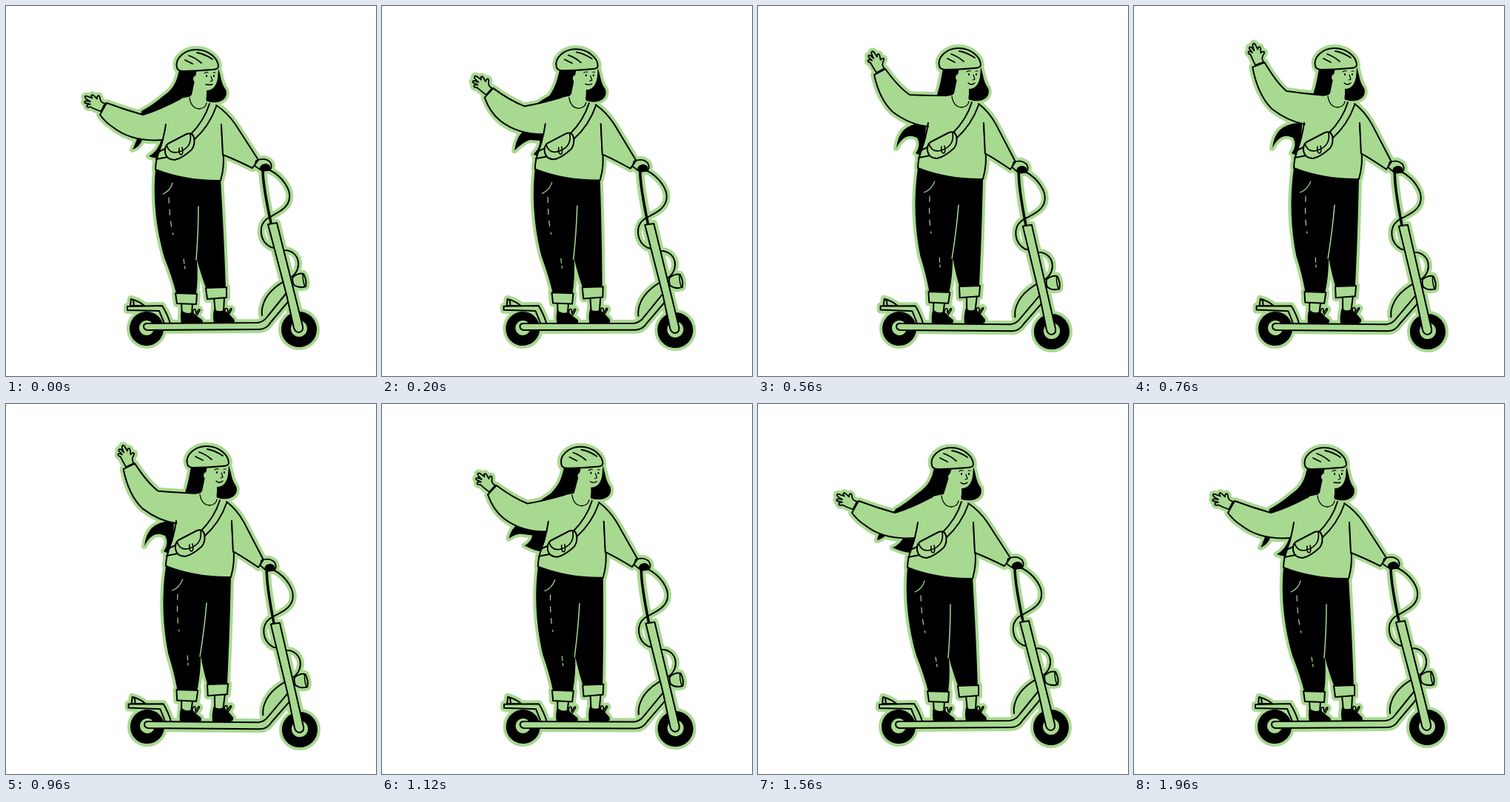
Recreate the animation shown at these times as an HTML page with a canvas. Size 500 px wide and 500 px high, loop 2 s.

```html
<!DOCTYPE html>
<html lang="en">
<head>
<meta charset="utf-8">
<title>Scooter wave</title>
<style>
html, body { margin: 0; width: 100%; height: 100%; overflow: hidden; background: #fff; }
canvas { display: block; }
</style>
</head>
<body>
<canvas id="stage" width="500" height="500"></canvas>
<script>
const ctx = document.getElementById('stage').getContext('2d');
const GREEN = '#a8d990', BLACK = '#000', LOOP = 2000, STEP = 40, HALO = 8;

const lerp = (a, b, k) => a + (b - a) * k;
const clamp = v => Math.max(0, Math.min(1, v));
const smooth = k => k * k * (3 - 2 * k);

// Find the keys around t and the eased progress between them.
function span(keys, t) {
  let i = 1;
  while (i < keys.length - 1 && keys[i][0] < t) i++;
  const [t0, a] = keys[i - 1], [t1, b] = keys[i];
  return [a, b, smooth(clamp((t - t0) / (t1 - t0)))];
}
const track = (keys, t) => lerp(...span(keys, t));

// Blend two path strings that share the same commands.
function morph(a, b, k) {
  const nums = b.match(/-?[\d.]+/g);
  let i = 0;
  return a.replace(/-?[\d.]+/g, n => lerp(+n, +nums[i++], k).toFixed(2));
}

// Send each coordinate pair of a path through a mapping.
const warp = (d, map) => d.replace(/(-?[\d.]+) (-?[\d.]+)/g,
  (_, x, y) => map(+x, +y).map(v => v.toFixed(2)).join(' '));

function ring(x, y, r) {
  const k = r * 0.5523;
  return `M${x - r} ${y} C${x - r} ${y - k} ${x - k} ${y - r} ${x} ${y - r} ` +
    `C${x + k} ${y - r} ${x + r} ${y - k} ${x + r} ${y} ` +
    `C${x + r} ${y + k} ${x + k} ${y + r} ${x} ${y + r} ` +
    `C${x - k} ${y + r} ${x - r} ${y + k} ${x - r} ${y} Z`;
}

const bodyKeys = [[0, 0], [40, 0], [450, 1], [1000, 1], [1290, 0], [2000, 0]];
const armKeys = [[0, 0], [40, 0], [440, 1.24], [560, 1], [760, 1.2], [960, 1.1], [1200, .22], [1480, 0], [2000, 0]];
const headKeys = [[0, 0], [1000, 0], [1200, 4], [1600, 4], [1900, 0], [2000, 0]];

const hairRest = 'M234 86 C230 108 222 115 212 122 Q198 134 183 142 L180 170 Q176 184 171 194 Q181 190 184 181 L210 180 Q206 196 193 203 Q202 207 212 206 L225 190 L250 125 L258 86 Z';
const hairSwoop = 'M236 86 C232 105 230 112 226 122 Q215 126 212 130 L208 160 Q178 162 176 197 Q188 182 200 182 L208 184 Q210 192 203 200 Q206 203 212 203 L225 190 L250 125 L258 86 Z';
const hairFork = 'M236 86 C233 105 231 112 228 122 Q216 126 214 130 L208 160 Q176 162 173 194 Q182 176 195 178 L201 180 Q207 190 199 201 Q206 205 212 206 L225 190 L250 125 L258 86 Z';
const hairFling = 'M238 86 C234 108 224 115 214 122 Q200 134 186 142 L165 160 Q160 168 156 176 Q164 178 168 176 L190 178 Q184 186 174 187 Q190 196 204 197 L225 190 L250 125 L262 86 Z';
const hairFall = 'M238 86 C234 108 224 115 214 122 Q200 134 186 142 L170 165 Q162 176 161 184 Q168 182 172 178 L198 178 Q192 190 182 194 Q194 200 206 201 L225 190 L250 125 L262 86 Z';
const hairKeys = [[0, hairRest], [320, hairSwoop], [560, hairFork], [960, hairFork], [1240, hairFling], [1560, hairFall], [1960, hairRest], [2000, hairRest]];

const sleeveLow = 'M136 131 Q160 140 185 147 Q208 140 236 125 L240 160 L214 182 Q170 184 145 164 Q134 157 127 147 Z';
const sleeveHigh = 'M158 87 Q176 112 191 122 Q210 123 240 123 L240 160 L216 165 Q190 162 168 145 Q150 128 143 95 Z';
const seamLow = 'M236 125 Q208 140 185 147 Q160 140 136 131 L127 147 Q134 157 145 164 Q170 184 212 181';
const seamHigh = 'M240 123 Q210 123 191 122 Q176 112 158 87 L143 95 Q150 128 168 145 Q190 162 216 165';

function buildParts(t) {
  const p = track(bodyKeys, t), q = track(armKeys, t), nod = track(headKeys, t);
  const smile = 1 + 3 * Math.max(p, nod / 4);
  const parts = [];

  const scoot = (x, y) => [x + p * (1 + .02 * (436 - y)), y + p * .015 * (x - 190)];
  const body = (x, y) => [x + 14 * p * Math.min(1, (405 - y) / 170), y - 2 * p * clamp((430 - y) / 40)];
  const head = (x, y) => body(x + nod, y);
  const reach = (x, y) => {
    const k = clamp((x - 292) / 55);
    return [x + p * lerp(14, 6, k), y + p * lerp(-2, 3, k)];
  };
  const palm = (x, y) => {
    const a = .61 * q, c = .9 * Math.cos(a), s = .9 * Math.sin(a), dx = x - 131, dy = y - 138;
    return body(131 + 20 * q + dx * c - dy * s, 138 - 48 * q + dx * s + dy * c);
  };

  const add = (map, d, fill, width = 0, color = BLACK, dash = []) =>
    parts.push({ path: new Path2D(warp(d, map)), fill, width, color, dash });
  const line = (map, d, width = 2, color, dash) => add(map, d, null, width, color, dash);
  const shape = (map, d, width = 2) => add(map, d, GREEN, width);
  const solid = (map, d) => add(map, d, BLACK);

  // Scooter
  shape(scoot, 'M386 366 C372 374 354 384 348 402 Q345 410 346 420 L356 412 L384 380 Z', 0);
  line(scoot, 'M357 222 C374 231 385 248 383 260 C381 275 364 280 352 288 C341 297 342 318 358 326 L376 330 C396 330 402 354 386 366 C372 374 354 384 348 402 Q345 410 346 418');
  solid(scoot, ring(190, 436, 23));
  solid(scoot, ring(396, 437, 24));
  shape(scoot, ring(190, 435, 10), 0);
  shape(scoot, ring(396, 436, 11), 0);
  shape(scoot, 'M168 405 L169 396 Q180 399 187 405 Z');
  line(scoot, 'M172 398 L173 405');
  shape(scoot, 'M164 406 L211 405 Q218 416 222 429 L214 429 L207 412 L164 411 Z');
  shape(scoot, 'M191 429 L340 428 Q348 427 353 420 L378 389 L385 395 L358 427 Q352 437 342 437 L191 438 Q186 437 186 433 Q186 429 191 429 Z');
  line(scoot, 'M347 221 Q347 242 358 293', 3.5);
  shape(scoot, 'M354 295 L366 293 L401 433 Q402 440 396 441 Q391 441 389 435 L379 390 Z');
  shape(scoot, 'M388 366 Q396 360 402 362 Q407 371 405 379 Q396 382 389 377 Q386 371 388 366 Z');
  line(scoot, 'M401 363 Q401 372 404 379', 1.5);

  // Legs and shoes
  shape(body, 'M237 401 L238 418 L251 418 L252 401 Z');
  shape(body, 'M281 394 L283 414 L294 414 L295 394 Z');
  solid(body, 'M237 411 Q244 417 251 414 Q256 416 258 419 L265 424 Q268 429 262 429 L237 429 Q235 420 237 411 Z');
  solid(body, 'M281 410 Q288 414 294 411 Q300 414 303 418 L308 423 Q311 428 305 429 L281 429 Q279 420 281 410 Z');
  line(body, 'M253 416 Q252 409 256 410 L257 416 Q261 407 262 411 L258 418', 1.6);
  line(body, 'M296 414 Q295 407 299 409 L300 415 Q304 406 305 410 L301 417', 1.6);
  solid(body, 'M202 221 Q246 238 290 235 Q293 285 295 330 L297 382 L271 383 Q264 365 258 343 Q260 365 257 390 L230 388 Q224 365 214 340 C204 305 198 262 202 221 Z');
  line(body, 'M260 271 Q260 305 257 343', 1.5, GREEN);
  line(body, 'M225 239 Q222 250 212 254', 1.2, GREEN);
  line(body, 'M220 259 Q221 290 226 309', 1.2, GREEN, [7, 9]);
  line(body, 'M240 342 L242 355', 1.2, GREEN, [6, 4]);
  shape(body, 'M229 388 L258 389 L257 403 L231 402 Z');
  shape(body, 'M270 381 L298 380 L298 394 L272 396 Z');

  // Hair, torso and waving arm
  solid(body, morph(...span(hairKeys, t)));
  solid(head, 'M286 82 C291 94 290 104 297 113 C301 124 291 134 271 129 L266 108 Z');
  add(body, 'M236 125 L250 122 L276 130 Q288 134 291 142 L293 195 Q296 218 290 236 Q245 236 202 221 Q204 205 212 184 L214 140 Z', GREEN);
  shape(palm, 'M134 131 C129 130 127 128 126 121 C125 118 122 119 122 124 L117 119 C114 117 112 119 115 123 L107 120 C103 119 103 123 107 125 L112 128 L106 127 C102 128 103 131 107 131 L112 132 L108 133 C105 135 108 138 112 136 C118 139 123 141 128 143 Z', 1.8);
  add(body, morph(sleeveLow, sleeveHigh, q), GREEN);
  line(body, morph(seamLow, seamHigh, q));
  line(body, 'M216 160 Q213 180 207 196 Q202 210 202 221 Q243 237 290 236 Q296 215 293 195 L291 160');

  // Head
  add(head, 'M258 86 L258 94 Q253 94 253 99 Q254 104 258 103 Q256 116 249 122 Q250 136 262 138 Q272 134 271 114 Q283 114 286 98 L287 84 Z', GREEN);
  line(body, 'M248 124 Q250 138 261 139 Q270 138 271 131', 1.3);
  line(head, 'M271 94 L271 95 M281 94 L281 95', 2);
  line(head, 'M268 91 Q270 89 273 90 M280 90 L283 90', 1.1);
  line(head, 'M277 95 L279 101 L276 102', 1.2);
  line(head, `M270 106 Q274 ${106 + smile} 279 106`, 1.3);
  shape(head, 'M231 83 C228 71 241 59 257 59 C274 59 287 71 287 82 Q286 86 278 86 Q256 88 240 88 Q232 88 231 83 Z');
  line(head, 'M242 73 L252 78 M247 67 Q256 70 264 77 M258 63 Q269 65 279 72', 1.8);

  // Bag
  line(body, 'M275 132 Q268 155 249 174 M284 136 Q275 162 254 181 M217 192 L204 198 M219 204 L203 207');
  shape(body, 'M219 186 L244 173 Q252 170 254 178 Q256 187 251 194 Q238 206 228 208 Q217 208 215 198 Q214 190 219 186 Z');
  line(body, 'M217 188 Q221 201 234 197 Q252 191 249 173', 1.7);
  line(body, 'M234 192 Q233 201 237 201 Q240 199 238 191', 1.6);

  // Arm on the handlebar
  add(reach, 'M284 134 Q299 144 310 160 L341 208 L333 219 Q311 208 293 201 L290 150 Z', GREEN);
  shape(reach, 'M338 209 Q350 204 357 211 Q361 218 356 222 L345 222 L336 216 Z', 1.8);
  solid(reach, 'M343 218 Q345 213 352 213 Q359 215 357 220 Q352 225 346 223 Q342 221 343 218 Z');
  line(reach, 'M284 134 Q299 144 310 160 L341 208 L333 219 Q311 208 293 201 L291 160');
  return parts;
}

function paint(part, halo) {
  const { path, fill, width, color, dash } = part;
  const w = width + (halo ? HALO : 0);
  ctx.setLineDash(halo ? [] : dash);
  if (fill) {
    ctx.fillStyle = halo ? GREEN : fill;
    ctx.fill(path);
  }
  if (w) {
    ctx.lineWidth = w;
    ctx.strokeStyle = halo ? GREEN : color;
    ctx.stroke(path);
  }
}

function frame() {
  const t = Math.floor(performance.now() / STEP) * STEP % LOOP;
  const parts = buildParts(t);
  ctx.fillStyle = '#fff';
  ctx.fillRect(0, 0, 500, 500);
  ctx.lineCap = ctx.lineJoin = 'round';
  for (const halo of [true, false]) parts.forEach(part => paint(part, halo));
  requestAnimationFrame(frame);
}
frame();
</script>
</body>
</html>
```
